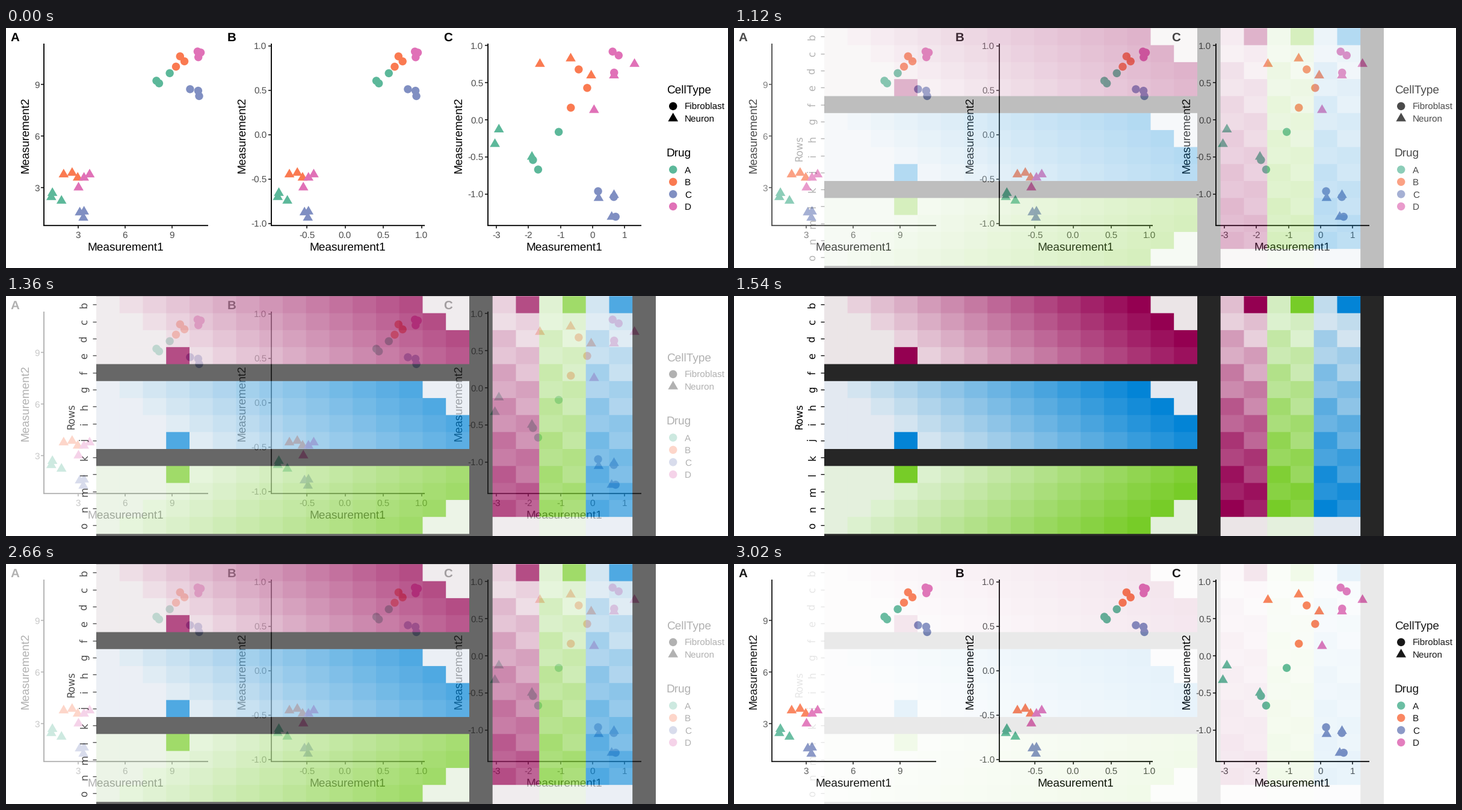
Write a matplotlib script that moves like this. It is 1200 px wide and 400 px high and loops after 3080 ms.

```python
import numpy as np
import matplotlib.pyplot as plt
from matplotlib.animation import FuncAnimation
from matplotlib.patches import Circle, Polygon

W, H, DPI = 1200, 400, 100
STEP, LOOP = 20, 3080          # ms
PT = 72 / DPI                  # points per pixel
TITLE, LABEL = 19, 15.2        # font sizes in pixels
INK, GREY, TICK = "black", "#4d4d4d", "#333333"
DRUGS = dict(A="#5cb89a", B="#fa7a51", C="#808fc2", D="#e071b7")
TOP, BOTTOM = 26, 329.2

plt.rcParams["text.hinting"] = "none"
fig = plt.figure(figsize=(W / DPI, H / DPI), dpi=DPI, facecolor="white")
ax = fig.add_axes([0, 0, 1, 1])
ax.axis("off")


def text(x, y, s, size=LABEL, color=INK, ha="left", font="Liberation Sans", **kw):
    return ax.text(x, y, s, fontsize=size * PT, color=color, ha=ha, va="baseline",
                   family=font, rotation_mode="anchor", **kw)


def line(xs, ys, color=INK, width=1.85, **kw):
    return ax.plot(xs, ys, color=color, lw=width * PT,
                   solid_capstyle="butt", **kw)[0]


def dot(x, y, color):
    ax.add_patch(Circle((x, y), 6.7, fc=color, lw=0, zorder=2))


def triangle(x, y, color, r=9.6):
    a = np.radians([-90, 30, 150])
    ax.add_patch(Polygon(np.c_[x + r * np.cos(a), y + r * np.sin(a)],
                         fc=color, lw=0, zorder=2))


# ---- measurements: three replicates per drug, drugs A to D ----

FIBROBLAST = np.array([
    (8.02, 9.23), (8.19, 9.08), (8.87, 9.67),
    (9.53, 10.65), (9.81, 10.36), (9.27, 10.05),
    (10.17, 8.74), (10.69, 8.65), (10.75, 8.34),
    (10.65, 10.93), (10.85, 10.87), (10.70, 10.60)])
NEURON = np.array([
    (1.37, 2.70), (1.30, 2.46), (1.95, 2.25),
    (2.09, 3.78), (2.63, 3.87), (2.99, 3.59),
    (3.12, 1.57), (3.39, 1.62), (3.35, 1.26),
    (3.39, 3.59), (3.75, 3.78), (3.04, 3.02)])


def robust_z(values, pool):
    """Centre by the pool's median and scale by its MAD."""
    mid = np.median(pool, axis=0)
    return (values - mid) / (1.4826 * np.median(abs(pool - mid), axis=0))


# ---- scatter panels ----

def panel(name, left, right, origin, unit, xticks, yticks, groups, fmt=("{:g}", "{:.1f}"),
          gap=50):
    """origin is the pixel of (0, 0), unit the pixels per data unit."""
    line([left, left], [TOP, BOTTOM + 0.9])
    line([left - 0.9, right], [BOTTOM, BOTTOM], snap=False)
    for v in xticks:
        x = origin[0] + v * unit[0]
        line([x, x], [BOTTOM + 1, BOTTOM + 5], TICK)
        text(x, 349.5, fmt[0].format(v), color=GREY, ha="center")
    for v in yticks:
        y = origin[1] - v * unit[1]
        line([left - 5, left - 1], [y, y], TICK)
        text(left - 7.5, y + 5.4, fmt[1].format(v), color=GREY, ha="right")
    text(left - gap - 23.5, 22.5, name, 20.5, weight="bold")
    text((left + right) / 2 - 0.3, 370.7, "Measurement1", TITLE, ha="center")
    text(left - gap + 6, 178.5, "Measurement2", TITLE, ha="center", rotation=90)

    for k, color in enumerate(DRUGS.values()):
        for mark, group in zip((dot, triangle), groups):
            for u, v in group[3 * k:3 * k + 3]:
                mark(origin[0] + u * unit[0], origin[1] - v * unit[1], color)


both = np.vstack([FIBROBLAST, NEURON])
cells = FIBROBLAST, NEURON
halves = np.arange(-1, 1.1, 0.5)

panel("A", 63, 336, (41.5, 352.5), (26, 28.667), (3, 6, 9), (3, 6, 9),
      cells, ("{}", "{}"), gap=32)
panel("B", 441, 696, (563.5, 177.5), (127, 148), halves[1:], halves,
      [robust_z(c, both) for c in cells], ("{:.1f}", "{:.1f}"))
panel("C", 801, 1056, (975, 153), (53.35, 123.7), range(-3, 2), halves,
      [robust_z(c, c) for c in cells])

# ---- legend ----

text(1098, 108.7, "CellType", TITLE)
dot(1108.7, 130.3, INK)
triangle(1108.7, 150.8, INK)
text(1128, 136, "Fibroblast")
text(1128, 156.3, "Neuron")
text(1097.5, 214.5, "Drug", TITLE)
for k, (name, color) in enumerate(DRUGS.items()):
    y = 236 + 20.45 * k
    dot(1108.7, y, color)
    text(1128, y + 5.6, name)


# ---- plate heatmap ----

LEFT, RIGHT, ROW0, ROW = 150, 1080, 0.3, 28.3
COL = (RIGHT - LEFT) / 24
LEVELS = 13


def rgb(code):
    return np.array([int(code[i:i + 2], 16) for i in (0, 2, 4)]) / 255


# empty well, lowest dose, highest dose
MAGENTA, BLUE, GREEN = [[rgb(c) for c in s.split()] for s in (
    "ebe5e7 e8d0dc 940052", "e3e9f1 d3e4f0 0484d6", "e4f0dd dcf1cf 78cc28")]


def shade(tint, level):
    return tint[1] + (tint[2] - tint[1]) * level / (LEVELS - 1)


def build_plate():
    plate = np.tile(rgb("262626"), (16, 24, 1))
    # dose series, shifted one well per row
    for tint, first, step in ((MAGENTA, 1, 1), (BLUE, 6, 1), (GREEN, 14, -1)):
        for shift in range(1, 5):
            r = first + step * (shift - 1)
            plate[r, :16] = tint[0]
            for level in range(LEVELS):
                c = level + shift
                plate[r, c if c < 16 else 3] = shade(tint, level)
    # column series, neighbouring wells swapped
    for k, tint in enumerate((MAGENTA, GREEN, BLUE)):
        c = 17 + 2 * k
        plate[:, c:c + 2] = tint[0]
        for r in range(LEVELS):
            plate[r + 1, c] = shade(tint, r ^ 1 if r < 12 else 12)
            plate[r + 1, c + 1] = shade(tint, (r - 1) ^ 1 if r else 12)
    return plate


def coverage(n, offset, size, count, sub=10):
    """Share of each cell in each of n pixels."""
    pos = (np.arange(n * sub) + 0.5) / sub
    idx = np.floor((pos - offset) / size).astype(int).clip(0, count - 1)
    return np.eye(count)[idx].reshape(n, sub, count).mean(axis=1)


cover = np.ones((H, W, 3))
cover[:, LEFT:RIGHT] = np.einsum(
    "yr,rck,xc->yxk", coverage(H, ROW0 - ROW, ROW, 16), build_plate(),
    coverage(RIGHT - LEFT, 0, COL, 24), optimize=True)

layer = [ax.imshow(cover.clip(0, 1), extent=(0, W, H, 0), aspect="auto",
                   interpolation="nearest", zorder=5)]
for k, letter in enumerate("bcdefghijklmno"):
    y = ROW0 + (k + 0.5) * ROW
    layer.append(line([144.2, 150], [y, y], width=1.35, zorder=6))
    layer.append(text(135.3, y + 0.3, letter, 16.5, ha="center", font="DejaVu Sans",
                      rotation=90, zorder=6))
layer.append(text(112.7, 200.3, "Rows", 16.5, ha="center", font="DejaVu Sans",
                  rotation=90, zorder=6))

ax.set_xlim(0, W)
ax.set_ylim(H, 0)


# ---- stepped cross-fade ----

def fade(t):
    def steps(start):
        return min(max((t - start) // 60 + 1, 0), 10)
    return (steps(1000) - steps(2540)) / 10


def update(i):
    for artist in layer:
        artist.set_alpha(fade(i * STEP))
    return layer


anim = FuncAnimation(fig, update, frames=LOOP // STEP, interval=STEP,
                     repeat=True, repeat_delay=0, blit=False)
plt.show()
```
